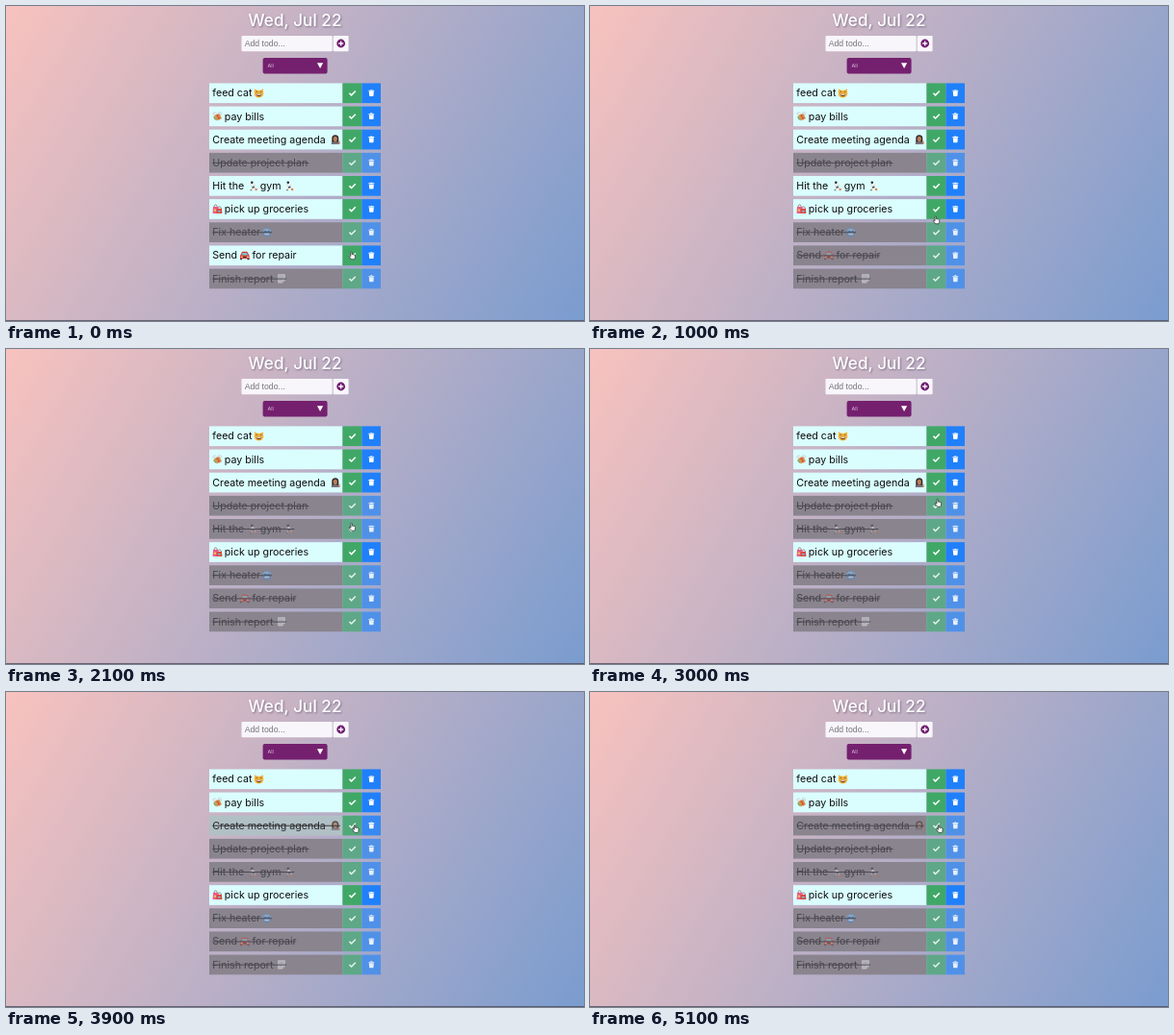
These frames come from a looping animation (600x328 px, 5200 ms). An HTML page:

```html
<!DOCTYPE html>
<html lang="en">
<head>
<meta charset="utf-8">
<title>Todo list</title>
<style>
html, body { margin: 0; width: 100%; height: 100%; overflow: hidden; }
body { background: linear-gradient(120deg, #f8c2be, #7a9ccf); }
svg { position: absolute; left: 0; top: 0; width: 600px; height: 328px; }
text { font-family: Inter, "Open Sans", sans-serif; white-space: pre; }
.item { font-size: 10.65px; }
</style>
</head>
<body>
<svg id="stage" viewBox="0 0 600 328">
  <defs>
    <path id="check" d="M-3.2 .2 L-1 2.3 L3.2 -2" fill="none" stroke="#fff" stroke-width="1.5"/>
    <g id="trash" fill="#fff">
      <path d="M-2.9 -2.8h1.7l.4 -.6h1.6l.4 .6h1.7v.9h-5.8z"/>
      <path d="M-2.5 -1.5h5l-.3 4.3q0 .6 -.6 .6h-3.2q-.6 0 -.6 -.6z"/>
    </g>
    <g id="cat">
      <path d="M-4.4 -4.6l2.8 1.5h3.2l2.8 -1.5l.4 5a4.8 4.3 0 0 1 -9.6 0z" fill="#f3b43c"/>
      <path d="M-3 -1q1 -1.2 1.8 0M1.2 -1q1 -1.2 1.8 0" fill="none" stroke="#5a3512" stroke-width=".8"/>
      <path d="M-2.8 1h5.6q-.5 2.6 -2.8 2.6t-2.8 -2.6z" fill="#6a3a20"/>
      <path d="M-2.2 1h4.4l-.4 1h-3.6z" fill="#fff"/>
    </g>
    <g id="money">
      <path d="M-4.8 -3.2q3 -2.2 4.6 1l-2 1.6q-2.4 -.4 -2.6 -2.6zM1 -4.4q3.6 -.4 3.4 2.4l-2.2 1.2z" fill="#e9eef2" stroke="#aab4bd" stroke-width=".4"/>
      <path d="M-3.4 -.8l5.2 -2l2.8 5l-5.4 2.4z" fill="#c99a4b"/>
      <path d="M-1.3 -1.7l1.5 -.5l2.8 5l-1.6 .7z" fill="#e5503e"/>
      <path d="M-4.4 .6l1.3 -.6l2 3.4l-1.4 .5z" fill="#7e9a58"/>
    </g>
    <g id="woman">
      <path d="M-3.5 4.8v-6a3.5 3.7 0 0 1 7 0v6z" fill="#332a2a"/>
      <path d="M-4.2 5q0 -2.8 4.2 -2.8t4.2 2.8z" fill="#77717d"/>
      <ellipse cy="-.6" rx="2.1" ry="2.7" fill="#b97f5c"/>
      <path d="M2.6 4.6l1.9 -3.6l.5 3.6z" fill="#b97f5c"/>
    </g>
    <g id="player">
      <path d="M-.9 -1.6l1.5 2.6l-1.8 1.4l-.8 2M.6 1l1.5 1.5l1 2M-.6 -.9l-2.3 .5M-.2 -1l2.3 .7" fill="none" stroke="#edc9ad" stroke-width="1.1"/>
      <path d="M-1.6 -2.2l1.5 -.4l1.3 3.2l-2 .8z" fill="#eef2fa"/>
      <path d="M-1.2 .9l1.9 -.7l1 1.4l-2.4 .7z" fill="#3d4c66"/>
      <circle cx="-1.2" cy="-3.5" r="1.3" fill="#3a2b29"/>
      <circle cx="3.2" cy="3.7" r="1.1" fill="#e6663c"/>
      <path d="M-2.9 4.4h1.6" stroke="#34323a" stroke-width=".8"/>
    </g>
    <g id="bags">
      <path d="M-3.6 -2.2q.2 -2.4 1.7 -2.4t1.7 2.4M.4 -.5q.2 -2 1.8 -2t1.8 2" fill="none" stroke="#7d5a43" stroke-width=".7"/>
      <path d="M-4.5 -2.4h5.2l.4 6.8h-6z" fill="#ee5a8c"/>
      <path d="M-.8 -.6h5.3l.4 5.2h-6z" fill="#d9493f"/>
      <path d="M-3.6 .2h2.2v2h-2.2z" fill="#f8c64e"/>
      <path d="M.6 1.4h2.6v1.6h-2.6z" fill="#6cc0dc"/>
    </g>
    <g id="cold">
      <circle r="4.6" fill="#3f8ee0"/>
      <path d="M-4.3 -1.2a4.6 4.6 0 0 1 8.6 0z" fill="#83c3f5"/>
      <path d="M-2.5 -.9h1.6M.9 -.9h1.6" stroke="#16345e" stroke-width="1"/>
      <rect x="-2.4" y="1" width="4.8" height="1.7" fill="#f3f7fb"/>
    </g>
    <g id="car">
      <path d="M-4.8 4.3v-4l1.8 -3.6q.3 -.7 1 -.7h4q.7 0 1 .7l1.8 3.6v4h-2v-1.1h-5.6v1.1z" fill="#d83a35"/>
      <path d="M-3.4 -.3l1.3 -2.6h4.2l1.3 2.6z" fill="#75c4cf"/>
      <path d="M-4 1h1.9v1h-1.9zM2.1 1h1.9v1h-1.9z" fill="#fbe9a8"/>
      <path d="M-1.6 1.2h3.2v1.2h-3.2zM-4.6 3.3h1.8v1.2h-1.8zM2.8 3.3h1.8v1.2h-1.8z" fill="#3b3a42"/>
    </g>
    <g id="page">
      <path d="M-3.8 -4.6h7.6v6.4l-2.8 2.8h-4.8z" fill="#f0f1f3"/>
      <path d="M3.8 1.8h-2.8v2.8z" fill="#b9bec6"/>
      <path d="M-2.6 -2.8h5M-2.6 -1.2h5M-2.6 .4h4M-2.6 2h2.6" stroke="#9ba3ae" stroke-width=".6"/>
    </g>
  </defs>

  <text x="300" y="21" text-anchor="middle" font-size="17.2" font-weight="500" fill="#fff"
    style="text-shadow:1px 1px 2px rgba(70,60,90,.5)">Wed, Jul 22</text>

  <rect x="244.5" y="31" width="94.2" height="16.3" rx="1" fill="#f8f6fb"/>
  <text x="247.7" y="42" font-size="8.7" fill="#77747b" style="font-family:'Liberation Sans',sans-serif">Add todo...</text>
  <rect x="339.6" y="31" width="16" height="16.3" rx="1" fill="#f8f6fb"/>
  <circle cx="347.7" cy="39" r="4.4" fill="#6f1d6f"/>
  <path d="M345.2 39h5M347.7 36.5v5" stroke="#f8f6fb" stroke-width="1.3"/>

  <rect x="266.6" y="54" width="67" height="16.6" rx="2" fill="#74206f"/>
  <text x="271.6" y="64" font-size="5.4" fill="#dcbfdc">All</text>
  <path d="M323 59.2h6.2l-3.1 5.8z" fill="#fff"/>

  <g id="list"></g>
  <path id="hand" d="M-1.6 -3.8q.7 -.7 1.3 .1v2.5q.6 -.5 1.1 .1q.7 -.4 1.1 .2q.8 -.3 1.1 .5v2q0 1.2 -.7 2.2h-3.4l-2.2 -3q-.2 -.9 .8 -.8l.9 .8z"
    fill="#fff" stroke="#26262a" stroke-width=".7" stroke-linejoin="round"/>
  <rect y="327" width="600" height="1" fill="#4c4a58" opacity=".75"/>
</svg>
<script>
const LOOP = 5200, FADE = 500;

// parts: [x, word] or [x, "#icon"]; end: right edge of the strike line; at: time of completion
const todos = [
  { parts: [[214.3, "feed cat"], [262.5, "#cat"]], end: 267.5 },
  { parts: [[219.5, "#money"], [226.8, "pay bills"]], end: 267 },
  { parts: [[214.3, "Create meeting agenda"], [341.8, "#woman"]], end: 346.8, at: 3750 },
  { parts: [[214.3, "Update project plan"]], end: 314.5, at: -FADE },
  { parts: [[214.3, "Hit the"], [256.5, "#player"], [263.8, "gym"], [294, "#player"]], end: 299.3, at: 1580 },
  { parts: [[219.5, "#bags"], [226.8, "pick up groceries"]], end: 313 },
  { parts: [[214.3, "Fix heater"], [270.8, "#cold"]], end: 276, at: -FADE },
  { parts: [[214.3, "Send"], [247.8, "#car"], [255.4, "for repair"]], end: 300.8, at: 60 },
  { parts: [[214.3, "Finish report"], [286, "#page"]], end: 291, at: -FADE }
];

// hand stops: [time, x, y]
const stops = [[0, 359.4, 260], [650, 359.4, 260], [1350, 360, 186.3], [1750, 360, 186.3],
  [2000, 359.6, 185.4], [2500, 359.6, 185.4], [3400, 363, 142.6], [LOOP, 363, 142.6]];

const list = document.getElementById("list");
const hand = document.getElementById("hand");

function add(parent, tag, attrs) {
  const el = document.createElementNS("http://www.w3.org/2000/svg", tag);
  for (const k in attrs) el.setAttribute(k, attrs[k]);
  return parent.appendChild(el);
}

const clamp = v => Math.max(0, Math.min(1, v));
const ease = p => 1 - (1 - p) ** 3 * (1 + 1.5 * p);
const smooth = p => p * p * (3 - 2 * p);
const mix = (a, b, k) => `rgb(${a.map((v, i) => Math.round(v + (b[i] - v) * k))})`;

const fills = {
  cell: [[218, 254, 254], [137, 132, 142]],
  tick: [[64, 168, 103], [94, 168, 135]],
  bin: [[32, 128, 250], [80, 145, 232]],
  ink: [[12, 12, 14], [72, 69, 76]]
};

const rows = todos.map((todo, i) => {
  const y = 80.4 + 24.15 * i, mid = y + 10.35;
  const g = add(list, "g", {});
  const box = (x, width) => add(g, "rect", { x, y, width, height: 20.7 });
  const row = { at: todo.at, cell: box(211, 138.4), tick: box(349.4, 20), bin: box(369.4, 19.6) };
  row.marks = ["check", "trash"].map((id, j) =>
    add(g, "use", { href: "#" + id, transform: `translate(${359.6 + 19.7 * j} ${mid - .2})` }));
  row.ink = add(g, "g", { class: "item" });
  row.icons = [];
  for (const [x, s] of todo.parts) {
    if (s[0] === "#") row.icons.push(add(g, "use", { href: s, transform: `translate(${x} ${mid})` }));
    else add(row.ink, "text", { x, y: mid + 3.6 }).textContent = s;
  }
  row.strike = add(g, "rect", { x: 214.3, y: mid - .3, width: todo.end - 214.3, height: .9 });
  return row;
});

function draw(t) {
  for (const row of rows) {
    const done = row.at !== undefined && t >= row.at;
    const k = done ? ease(clamp((t - row.at) / FADE)) : 0;
    for (const name in fills) row[name].setAttribute("fill", mix(...fills[name], k));
    row.strike.setAttribute("fill", mix(...fills.ink, k));
    row.strike.setAttribute("opacity", done ? 1 : 0);
    row.icons.forEach(el => el.setAttribute("opacity", 1 - .5 * k));
    row.marks.forEach(el => el.setAttribute("opacity", 1 - .15 * k));
  }
  const n = stops.findIndex(s => s[0] > t);
  const [t0, x0, y0] = stops[n - 1], [t1, x1, y1] = stops[n];
  const p = smooth((t - t0) / (t1 - t0));
  hand.setAttribute("transform", `translate(${x0 + (x1 - x0) * p} ${y0 + (y1 - y0) * p})`);
}

function tick() {
  draw(performance.now() % LOOP);
  requestAnimationFrame(tick);
}
tick();
</script>
</body>
</html>
```
